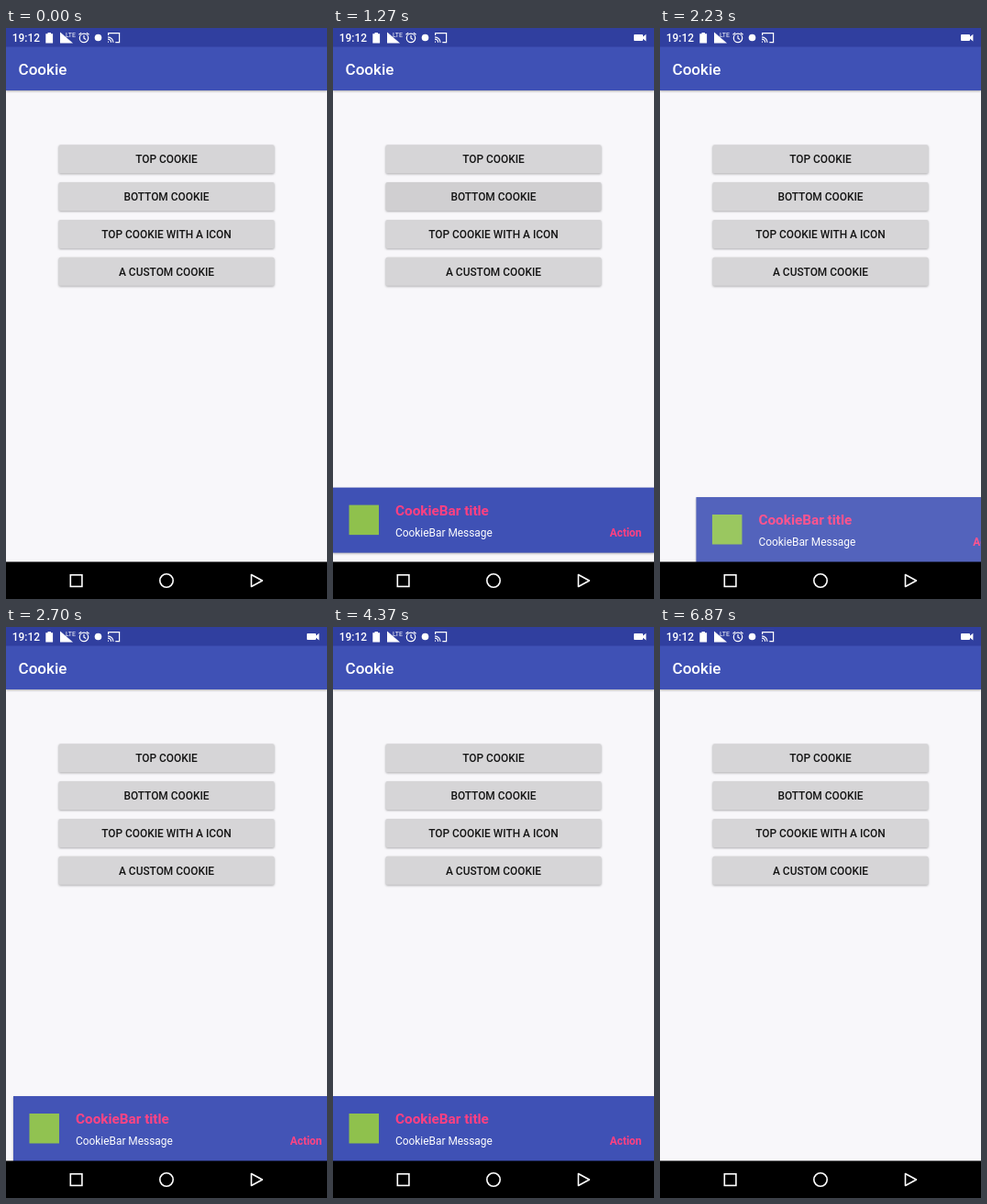
Recreate the animation shown at these times as an HTML page. Size 350 by 622 pixels, loop 8000 ms.

```html
<!DOCTYPE html>
<html lang="en">
<head>
<meta charset="utf-8">
<title>Cookie</title>
<style>
  html, body { margin: 0; width: 100%; height: 100%; overflow: hidden; background: #000; }
  svg { display: block; width: 350px; height: 622px; font: 500 11.9px Roboto, sans-serif; }
  .shade { filter: drop-shadow(0 1px 1px rgba(0, 0, 0, .3)); }
  .line { fill: none; stroke: #fff; }
  .pink { fill: #ff4081; font-weight: 700; }
</style>
</head>
<body>
<svg viewBox="0 0 350 622">
  <rect width="350" height="622" fill="#f8f7fa"/>
  <g id="buttons" text-anchor="middle"></g>

  <rect class="shade" y="20" width="350" height="48" fill="#3f51b5"/>
  <rect width="350" height="20.5" fill="#303f9f"/>
  <text x="13.6" y="51" font-size="17" fill="#fff">Cookie</text>

  <g fill="#fff">
    <text x="6.8" y="14.8">19:12</text>
    <path d="M43.3 6.2h2.2V5h3.4v1.2h2.2v10.3h-7.8z"/>
    <path d="M59 4.5V16.4H73z"/>
    <text x="65" y="9.6" font-size="7" font-weight="400">LTE</text>
    <circle cx="100.5" cy="10.5" r="3.8"/>
    <path id="camera" d="M329 7h8q1 0 1 1v1.6l3.4-2.8v7.6L338 11.700V13q0 1-1 1h-8q-1 0-1-1V8q0-1 1-1z"/>
  </g>
  <g class="line" stroke-width="1.2">
    <circle cx="85" cy="10.9" r="4.7"/>
    <path d="M85 8v3.2l2.2 1.400M79.500 7.300l2.700-2.200M90.500 7.300l-2.700-2.200"/>
    <path d="M111.600 8V5.600h12v10h-4.300M111 9.800a6 6 0 0 1 6 6M111 12.200a3.600 3.600 0 0 1 3.600 3.600M111 15.200h1"/>
  </g>

  <g id="bar">
    <rect class="shade" width="350" height="71" fill="#3f51b5"/>
    <rect x="17.500" y="19" width="32.500" height="32.500" fill="#8fc14d"/>
    <text class="pink" x="68" y="30" font-size="15.3">CookieBar title</text>
    <text x="68" y="53.300" fill="#fff" font-weight="400">CookieBar Message</text>
    <text class="pink" x="336.500" y="53.300" text-anchor="end">Action</text>
  </g>

  <rect y="581.500" width="350" height="40.500"/>
  <g class="line" stroke-width="1.6">
    <rect x="70.300" y="595.800" width="12.600" height="12.600"/>
    <circle cx="175" cy="602" r="7.200"/>
    <path d="M267.500 595.500v13l12-6.500z" stroke-linejoin="round"/>
  </g>
</svg>
<script>
const LOOP = 8000, BAR_TOP = 511, BAR_HEIGHT = 71, WIDTH = 350;
const $ = id => document.getElementById(id);

$('buttons').innerHTML = ['TOP COOKIE', 'BOTTOM COOKIE', 'TOP COOKIE WITH A ICON', 'A CUSTOM COOKIE']
  .map((label, i) => `<g transform="translate(57.5 ${127.2 + i * 40.85})">
    <rect class="shade" width="235" height="31" rx="1.7" fill="#d6d5d7"/>
    ${i === 1 ? `<clipPath id="face"><rect width="235" height="31" rx="1.7"/></clipPath>
      <circle id="ripple" cx="117" cy="15" clip-path="url(#face)"/>` : ''}
    <text x="117.5" y="20.2" fill="#141414">${label}</text></g>`).join('');

const bar = $('bar'), ripple = $('ripple'), camera = $('camera');

const progress = (t, from, to) => Math.min(1, Math.max(0, (t - from) / (to - from)));
const smooth = u => u * u * (3 - 2 * u);
const overshoot = u => 1 + (u - 1) ** 2 * (3.15 * (u - 1) + 2.15);
const between = (t, from, to) => smooth(progress(t, from, to));

function draw(t) {
  camera.style.display = t < 30 ? 'none' : '';

  // Press spreads from the middle, then fades on release
  const press = progress(t, 700, 900), release = progress(t, 1070, 1570);
  ripple.setAttribute('r', 120 * press);
  ripple.setAttribute('opacity', 0.12 * (1 - release) ** 3);

  // Swipe right, let go; swipe left, hold, let go
  const x = 140 * (between(t, 2070, 2530) - between(t, 2530, 2730))
          - 100 * (between(t, 3530, 4000) - between(t, 4160, 4370));
  const y = BAR_TOP + BAR_HEIGHT * (1 - overshoot(progress(t, 1095, 1400)) + progress(t, 6550, 6870) ** 2);
  bar.style.display = t > 1095 && t < 6870 ? '' : 'none';
  bar.setAttribute('transform', `translate(${x} ${y})`);
  bar.setAttribute('opacity', 1 - Math.abs(x) / WIDTH);
}

function tick() {
  draw(performance.now() % LOOP);
  requestAnimationFrame(tick);
}
tick();
</script>
</body>
</html>
```
